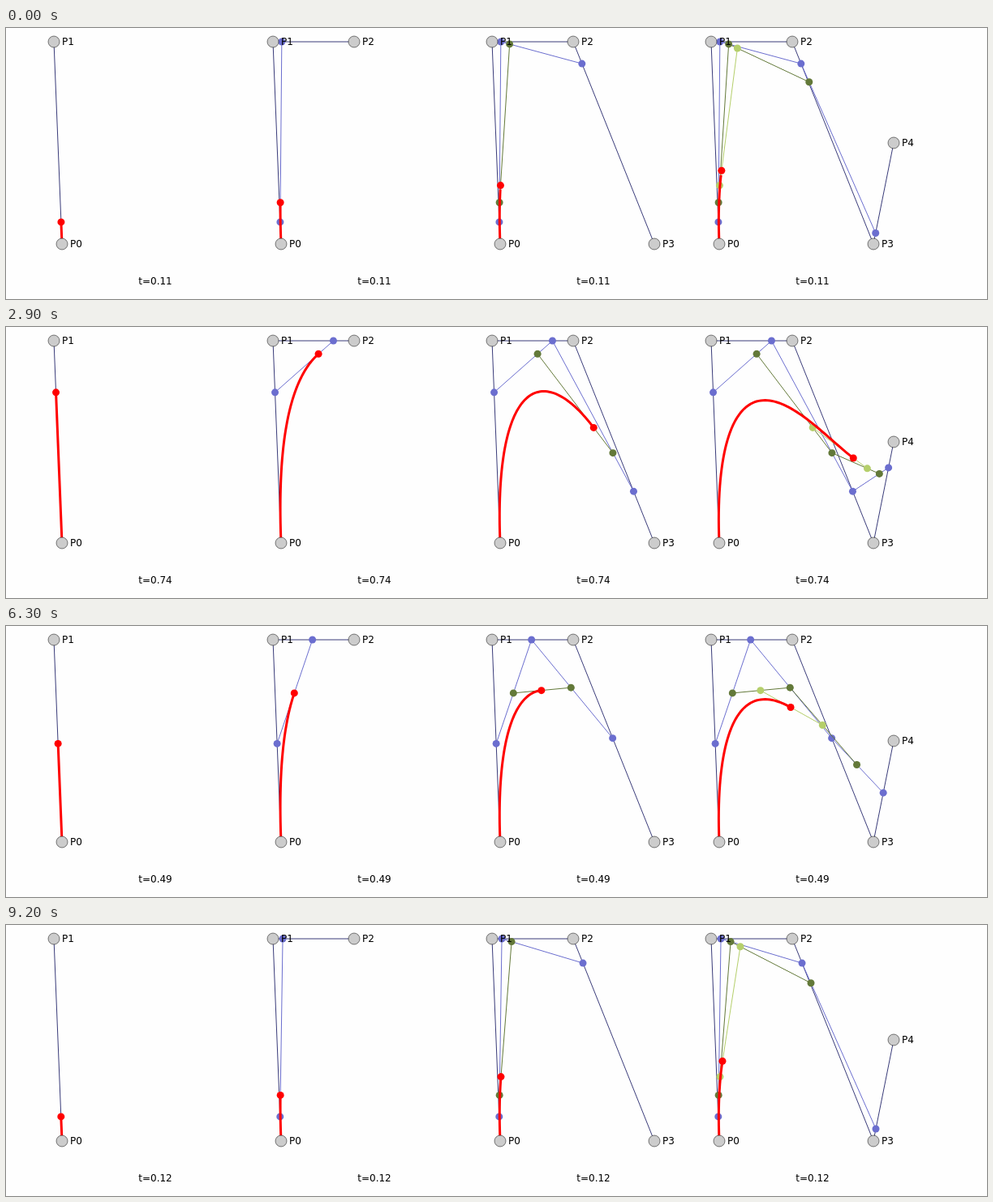
Write an HTML page that moves like this. It is 1209 px wide and 335 px high and loops after 9.3 s.

```html
<!DOCTYPE html>
<html lang="en">
<head>
<meta charset="utf-8">
<title>Bézier curve construction</title>
<style>
  html, body { margin: 0; width: 100%; height: 100%; overflow: hidden; background: #fefefe; }
  svg { display: block; width: 1209px; height: 335px; }
  text { font: 12px "DejaVu Sans", Verdana, sans-serif; fill: #000; }
  .hull, .curve { fill: none; }
  .curve { stroke: #f00; stroke-width: 3; }
  .anchor { fill: #ccc; stroke: #000; stroke-width: .5; }
  .readout { text-anchor: middle; }
</style>
</head>
<body>
<svg id="stage" viewBox="0 0 1209 335"></svg>
<script>
const LOOP = 9300, STEP = 100;
const COLORS = ['#393b79', '#6b6ecf', '#637939', '#b5cf6b'];
const POINTS = [[69, 267], [59, 17], [159, 17], [259, 267], [284, 142]];
const PANEL_WIDTH = 270;
const SAMPLES = 100;

// [step, progress]; the whole part of the progress counts finished sweeps
const PACE = [[0, .1083], [17, .4805], [29, .7447], [47, 1.1373], [63, 1.4865], [82, 1.8998], [92, 2.1204]];

const stage = document.getElementById('stage');

function add(parent, tag, attrs = {}) {
  const el = document.createElementNS(stage.namespaceURI, tag);
  for (const name in attrs) el.setAttribute(name, attrs[name]);
  return parent.appendChild(el);
}

const pathOf = points => 'M' + points.map(p => p.map(v => v.toFixed(2)).join(' ')).join('L');

const reduce = (points, t) => points.slice(1).map((p, i) =>
  p.map((v, axis) => points[i][axis] * (1 - t) + v * t));

function pointAt(points, t) {
  while (points.length > 1) points = reduce(points, t);
  return points[0];
}

function makePanel(index) {
  const degree = index + 1;
  const shift = index * PANEL_WIDTH;
  const points = POINTS.slice(0, degree + 1).map(([x, y]) => [x + shift, y]);
  const addDot = fill => add(stage, 'circle', { r: 4.5, fill });

  const levels = COLORS.slice(0, degree).map((color, level) => {
    const dotCount = level ? degree + 1 - level : 0;
    return {
      dots: Array.from({ length: dotCount }, () => addDot(color)),
      line: add(stage, 'path', { class: 'hull', stroke: color })
    };
  });
  const tip = addDot('#f00');
  const curve = add(stage, 'path', { class: 'curve' });

  points.forEach(([x, y], i) => {
    add(stage, 'circle', { class: 'anchor', cx: x, cy: y, r: 7 });
    add(stage, 'text', { x: x + 10, y: y + 4 }).textContent = 'P' + i;
  });
  const readout = add(stage, 'text', { class: 'readout', x: 184 + shift, y: 317 });

  const place = (dot, [x, y]) => {
    dot.setAttribute('cx', x);
    dot.setAttribute('cy', y);
  };

  return t => {
    let current = points;
    for (const { line, dots } of levels) {
      line.setAttribute('d', pathOf(current));
      dots.forEach((dot, i) => place(dot, current[i]));
      current = reduce(current, t);
    }
    place(tip, current[0]);
    // The trace only reaches the last whole sample behind the tip
    const length = Math.floor(t * SAMPLES) + 1;
    const trace = Array.from({ length }, (_, i) => pointAt(points, i / SAMPLES));
    curve.setAttribute('d', pathOf(trace));
    readout.textContent = 't=' + t.toFixed(2);
  };
}

function progressAt(step) {
  const i = Math.max(1, PACE.findIndex(([s]) => s >= step));
  const [s0, p0] = PACE[i - 1], [s1, p1] = PACE[i];
  return (p0 + (p1 - p0) * (step - s0) / (s1 - s0)) % 1;
}

const panels = [0, 1, 2, 3].map(makePanel);
const start = performance.now();
let shown = -1;

function render() {
  const elapsed = Math.max(0, performance.now() - start);
  const step = Math.floor(elapsed % LOOP / STEP);
  if (step !== shown) {
    shown = step;
    const t = progressAt(step);
    panels.forEach(draw => draw(t));
  }
  requestAnimationFrame(render);
}
render();
</script>
</body>
</html>
```
